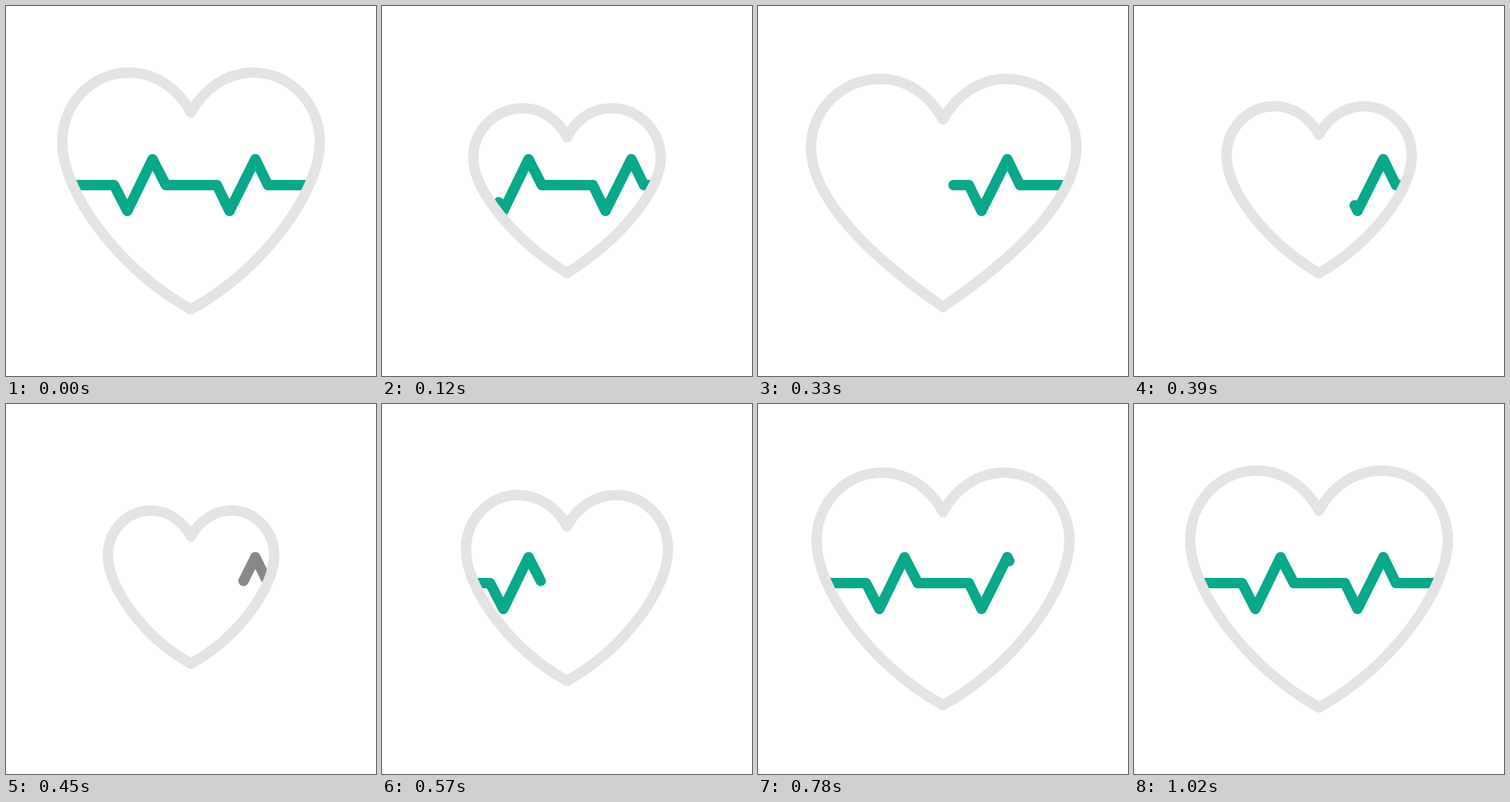
These frames come from a looping animation (500 px wide and 500 px high, 1790 ms). An HTML page without scripts:

```html
<!DOCTYPE html>
<html lang="en">
<head>
<meta charset="utf-8">
<title>Heartbeat</title>
<style>
  html, body { margin: 0; width: 100%; height: 100%; overflow: hidden; background: #fff; }
  svg { display: block; width: 100%; height: 100%; }

  .ring, .pulse {
    fill: none;
    stroke-width: 14;
    stroke-linecap: round;
    stroke-linejoin: round;
  }
  .ring { stroke: #e3e3e3; }
  .pulse { stroke: #08a88a; animation: fade 1790ms step-end infinite; }

  /* Left half of the heart; the right half is its mirror image. */
  .half { animation: beat 1790ms infinite; }
  .right {
    transform-origin: 250px 0;
    animation: beat 1790ms infinite, lean 1790ms linear infinite;
  }

  .trace { stroke-dasharray: 540 1300; }
  .erase { animation: erase 1790ms linear infinite; }
  .draw { animation: draw 1790ms linear infinite; }

  @keyframes beat {
    0%, 53.63%, 100% {
      d: path("M250 144C233 112 202 90 166 90C116 90 76 132 76 184C76 250 150 355 250 410");
      animation-timing-function: cubic-bezier(.37, 0, .72, .9);
    }
    6.704% {
      d: path("M250 177C238 153 216 138 190 138C153 138 123 168 123 205C123 250 180 318 250 361");
      animation-timing-function: ease-out;
    }
    8.38% {
      d: path("M250 181C239 158 218 143.5 193 143.5C157 143.5 128.5 172 128.5 207C128.5 250 183 314 250 355");
      animation-timing-function: cubic-bezier(.333, 0, .667, 1);
    }
    16.76% {
      d: path("M250 148C231 114 200 91 160 91C104 91 60 136 60 188C60 262 146 340 250 409");
      animation-timing-function: ease-in;
    }
    18.436% {
      d: path("M250 153C232 120 201 98 165 98C113 98 71 140 71 191C71 260 150 338 250 407");
      animation-timing-function: cubic-bezier(.333, .25, .667, 1);
    }
    23.464% {
      d: path("M250 179C239 158.5 219 144.4 196 144.4C163.7 144.4 138 171.4 138 205C138 247.4 185.6 315 250 350.4");
      animation-timing-function: cubic-bezier(.47, 0, .01, 1);
    }
  }

  @keyframes lean {
    0%, 8.38%, 23.464%, 100% { transform: scale(-1, 1); }
    16.76% { transform: scale(-1.02, 1); }
    18.436% { transform: scale(-1.011, 1); }
  }

  @keyframes erase {
    0% { stroke-dashoffset: 0; }
    36.76%, 100% { stroke-dashoffset: -560; }
  }

  @keyframes draw {
    0%, 17.77% { stroke-dashoffset: 545; }
    50.5%, 100% { stroke-dashoffset: 0; }
  }

  @keyframes fade {
    0%, 30% { stroke: #08a88a; }
    24.6% { stroke: #888; }
  }
</style>
</head>
<body>
<svg viewBox="0 0 500 500">
  <defs>
    <clipPath id="inside">
      <path class="half"/>
      <path class="half right"/>
    </clipPath>
    <path id="wave" d="M69 242H146L164 277L198 207L216 242H285L302 277L337 207L354 242H431"/>
  </defs>
  <g class="pulse" clip-path="url(#inside)">
    <use class="trace erase" href="#wave"/>
    <use class="trace draw" href="#wave"/>
  </g>
  <g class="ring">
    <path class="half"/>
    <path class="half right"/>
  </g>
</svg>
</body>
</html>
```
